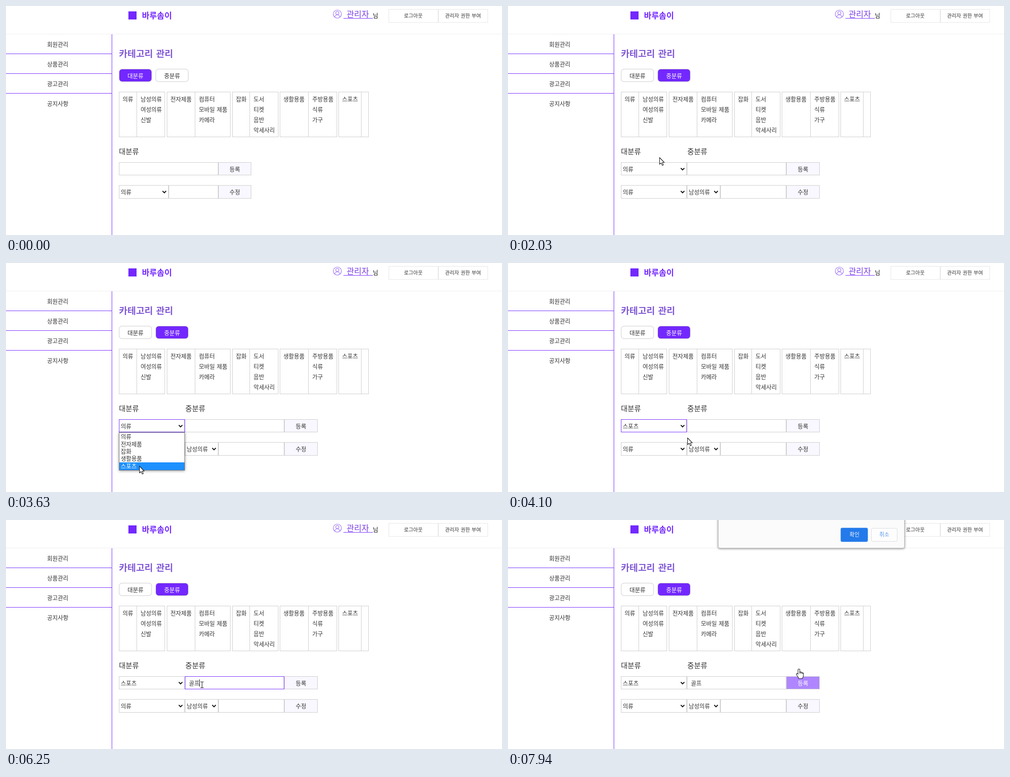
These frames come from a looping animation (1098x510 px, 8000 ms). An HTML page with a canvas:

```html
<!DOCTYPE html>
<html lang="ko">
<head>
<meta charset="utf-8">
<title>카테고리 관리</title>
<style>
html, body { margin: 0; width: 100%; height: 100%; overflow: hidden; background: #fff; }
canvas { display: block; }
</style>
</head>
<body>
<canvas id="stage" width="1098" height="510"></canvas>
<script>
const g = document.getElementById('stage').getContext('2d');
const LOOP = 8000, TICK = 67.3;
const PURPLE = '#7328ff', LINE = '#ccc', INK = '#333', PALE = '#f9f7ff';

// left edge, divider, right edge, name, items
const groups = [
  [250, 290, 352, '의류', ['남성의류', '여성의류', '신발']],
  [356, 419, 497, '전자제품', ['컴퓨터', '모바일 제품', '카메라']],
  [501, 540, 603, '잡화', ['도서', '티켓', '음반', '악세사리']],
  [606, 670, 733, '생활용품', ['주방용품', '식류', '가구']],
  [736, 787, 803, '스포츠', []]
];

// time, x, y of the pointer's hot spot
const path = [
  [130, 1036, 488], [880, 373, 151], [1410, 373, 151], [2160, 331, 356],
  [2490, 331, 356], [2890, 322, 396], [3160, 294, 451], [3560, 294, 451],
  [3630, 295, 452], [3830, 295, 452], [4240, 432, 368], [4380, 432, 368],
  [4570, 434, 367], [6650, 434, 367], [6790, 465, 348], [6930, 465, 348],
  [7300, 570, 318], [7560, 645, 356], [7810, 645, 356], [7940, 644, 332]
];
const clicks = [[950, 1080], [2490, 2560], [3830, 3900], [4970, 5050], [7740, 7810]];
const typing = [[5640, 'ㄱ'], [5840, '고'], [5970, '골'], [6120, '골ㅍ'], [6250, '골프']];
const caretOn = [[4970, 5440], [5640, 6720], [7190, 7660]];

const within = (t, spans) => spans.some(([a, b]) => t >= a && t < b);

function fill(x, y, w, h, color) {
  g.fillStyle = color;
  g.fillRect(x, y, w, h);
}

function box(x, y, w, h, border = LINE, bg = '#fff') {
  fill(x, y, w, h, border);
  fill(x + 1, y + 1, w - 2, h - 2, bg);
}

function round(x, y, w, h, r, border, bg) {
  const layer = (inset, color) => {
    g.beginPath();
    g.roundRect(x + inset, y + inset, w - 2 * inset, h - 2 * inset, r - inset);
    g.fillStyle = color;
    g.fill();
    g.shadowColor = 'transparent';
  };
  layer(0, border);
  layer(1, bg);
}

function shadow(blur, color) {
  g.shadowColor = color;
  g.shadowBlur = blur;
  g.shadowOffsetY = 1;
}

// cy is the vertical middle of the glyphs
function text(s, x, cy, size = 12.8, color = INK, weight = 350, align = 'left') {
  g.font = `${weight} ${size}px "Noto Sans CJK KR", "Noto Sans CJK", sans-serif`;
  g.wordSpacing = size * .1 + 'px';
  g.textAlign = align;
  g.fillStyle = color;
  g.fillText(s, x, cy + size * .37);
}

function select(x, y, w, h, value, focused) {
  box(x, y, w, h, focused ? PURPLE : LINE);
  text(value, x + 4, y + 15);
  const cx = x + w - 9.5;
  g.beginPath();
  g.moveTo(cx - 4, y + 13);
  g.lineTo(cx, y + 17);
  g.lineTo(cx + 4, y + 13);
  g.strokeStyle = '#111';
  g.lineWidth = 2;
  g.stroke();
}

function button(x, y, w, h, label, hover) {
  box(x, y, w, h, LINE, hover ? '#af86ff' : PALE);
  text(label, x + w / 2, y + 15, 12.8, hover ? '#fff' : INK, 350, 'center');
}

function tab(x, label, active) {
  round(x, 140, 73, 29, 7, LINE, active ? PURPLE : '#fff');
  text(label, x + 19, 155, 12.8, active ? '#fff' : INK);
}

function header() {
  fill(0, 62, 1098, 1, '#eee');
  fill(271, 12, 18, 18, PURPLE);
  text('바루솜이', 301, 21, 18, PURPLE, 900);
  g.strokeStyle = '#9a6cf5';
  g.lineWidth = 1.2;
  g.beginPath();
  g.arc(733.5, 18, 9, 0, 7);
  g.moveTo(737, 15.5);
  g.arc(733.5, 15.5, 3.5, 0, 7);
  g.moveTo(728, 25);
  g.bezierCurveTo(728, 18, 739, 18, 739, 25);
  g.stroke();
  text('관리자', 754, 18, 18, '#7a3ee8');
  fill(747, 27, 65, 1, PURPLE);
  text('님', 812, 21, 13, '#111');
  box(847, 7, 110, 30, '#e5e5e5');
  box(957, 7, 110, 30, '#e5e5e5');
  text('로그아웃', 881, 22, 11.2);
  text('관리자 권한 부여', 972, 22, 11.2);
}

function sidebar() {
  ['회원관리', '상품관리', '광고관리', '공지사항'].forEach((s, i) => {
    text(s, 91, 85 + 44 * i);
    if (i < 3) fill(0, 106 + 44 * i, 235, 1, PURPLE);
  });
  fill(234, 63, 1, 447, PURPLE);
}

function table() {
  for (const [x, mid, end, name, items] of groups) {
    box(x, 191, end - x, 101);
    fill(mid - 1, 191, 1, 101, LINE);
    text(name, x + 8, 207.5);
    items.forEach((s, i) => text(s, mid + 8, 207.5 + 23 * i));
  }
}

function menu(active) {
  g.save();
  shadow(6, 'rgba(0,0,0,.4)');
  fill(250, 377, 146, 85, '#777');
  g.restore();
  fill(251, 378, 144, 83, '#fff');
  groups.forEach((row, i) => {
    if (i === active) fill(251, 378 + 16.5 * i, 144, 17, '#1e90ff');
    text(row[3], 254, 386.5 + 16.4 * i, 12.8, i === active ? '#fff' : INK);
  });
}

function simpleForm() {
  box(250, 348, 220, 29);
  button(470, 348, 73, 29, '등록');
  select(250, 399, 110, 30, '의류');
  box(360, 399, 110, 30);
  button(470, 399, 73, 30, '수정');
}

function fullForm(t, hover) {
  const focused = t >= 4970 && t < 7740;
  text('중분류', 397, 324, 16);
  select(250, 348, 146, 29, t < 3830 ? '의류' : '스포츠', t >= 2490 && t < 4970);
  box(396, 348, 220, 29, focused ? PURPLE : LINE);
  button(616, 348, 74, 29, '등록', hover);
  select(250, 399, 146, 30, '의류');
  select(396, 399, 74, 30, '남성의류');
  box(470, 399, 146, 30);
  button(616, 399, 74, 30, '수정');

  const typed = typing.filter(k => t >= k[0]).map(k => k[1]).pop() || '';
  text(typed, 405, 363);
  if (focused && within(t, caretOn)) fill(405 + Math.round(typed.length * 11.7), 355, 1, 16, '#000');
}

function dialog(alpha) {
  g.save();
  g.globalAlpha = alpha;
  shadow(5, 'rgba(0,0,0,.5)');
  round(465, -90, 413, 153, 4, '#bbb', '#fff');
  text('등록 하시겠습니까?', 482, -5, 12, '#777');
  round(736, 17, 61, 32, 4, '#78adf5', '#1f78ea');
  text('확인', 767, 33, 12, '#fff', 500, 'center');
  round(804, 18, 58, 30, 4, '#dadce0', '#fff');
  text('취소', 833, 33, 12, '#4a8fec', 400, 'center');
  g.restore();
}

function pointerAt(t) {
  const q = Math.floor((t + 12) / TICK) * TICK;
  let i = path.findIndex(k => k[0] > q);
  if (i < 0) return path[path.length - 1].slice(1);
  i = Math.max(i, 1);
  const [t0, x0, y0] = path[i - 1], [t1, x1, y1] = path[i];
  const u = Math.max(0, (q - t0) / (t1 - t0)), e = u * u * (3 - 2 * u);
  return [x0 + (x1 - x0) * e, y0 + (y1 - y0) * e];
}

const arrow = new Path2D('M.5.5V15.5L4 12.4 6.5 18 9 17 6.6 11.5H11Z');
const hand = new Path2D('M-2 1Q0-1.5 2 1V7Q4 5.5 5 7.5 7 6.5 8 8.5 10 8 10 10.5V14Q10 17 8 19.5V21H-1V19Q-3 16-5.5 12.5-6 10-4.5 9.5-3.5 9.5-2 11.5Z');
const knuckles = new Path2D('M2 7V10M5 8V10.5M8 9V11');
const beam = new Path2D('M-3.5-6.5H-1Q0-6.5 0-5 0-6.5 1-6.5H3.5M0-5V5M-3.5 6.5H-1Q0 6.5 0 5 0 6.5 1 6.5H3.5');

function pointer(x, y, kind) {
  g.save();
  g.translate(Math.round(x), Math.round(y));
  g.strokeStyle = '#111';
  g.lineWidth = 1.1;
  g.lineJoin = 'round';
  if (kind !== beam) {
    g.fillStyle = '#fff';
    g.fill(kind);
  }
  g.stroke(kind);
  if (kind === hand) g.stroke(knuckles);
  g.restore();
}

function draw(t) {
  const full = t >= 1080;
  const [x, y] = pointerAt(t);
  const hover = t >= 7500 && (t >= 7700 || (x > 616 && y > 348));
  const onTab = x > 331 && x < 404 && y > 140 && y < 169;
  const onInput = full && x > 396 && x < 616 && y > 345 && y < 377;

  fill(0, 0, 1098, 510, '#fff');
  header();
  sidebar();
  text('카테고리 관리', 250, 106, 20.5, '#8159d6', 700);
  tab(250, '대분류', !full);
  tab(331, '중분류', full);
  table();
  text('대분류', 250, 324, 16);
  if (full) fullForm(t, hover);
  else simpleForm();
  if (t >= 2490 && t < 3830) {
    menu(Math.max(0, Math.min(4, Math.floor((y - 381) / 16.5))));
  }
  if (t >= 7810) dialog(t < 7870 ? .4 : t < 7940 ? .7 : .95);
  if (t < 130) return;
  if (within(t, clicks)) {
    g.fillStyle = 'rgba(255,240,50,.75)';
    g.beginPath();
    g.arc(x - 1, y - 1, 11, 0, 7);
    g.fill();
  }
  pointer(x, y, onTab || hover ? hand : onInput ? beam : arrow);
}

const start = performance.now();
function loop() {
  draw((performance.now() - start) % LOOP);
  requestAnimationFrame(loop);
}
loop();
</script>
</body>
</html>
```
